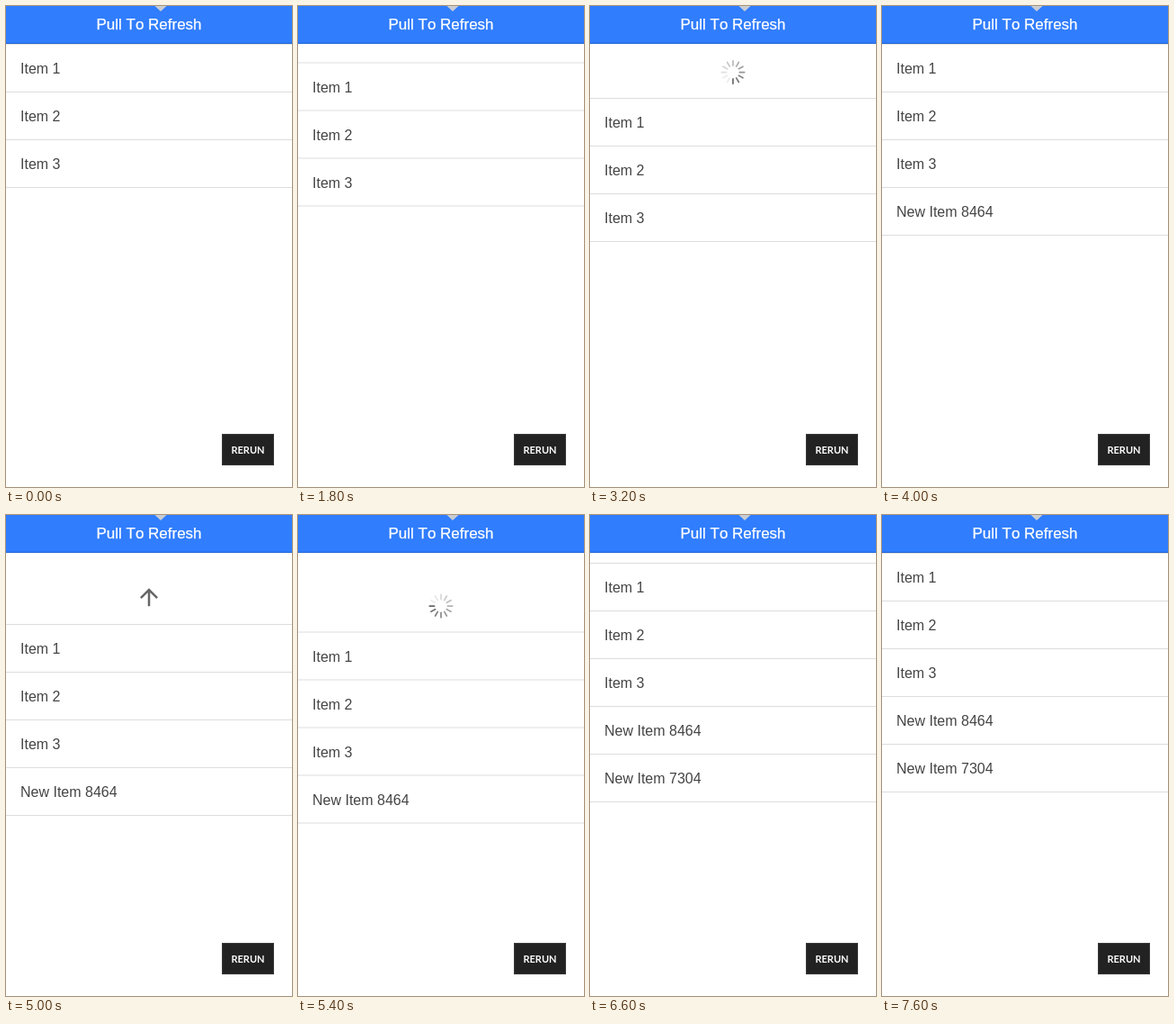
Recreate the animation shown at these times as an HTML page with a canvas. Size 318 px wide and 534 px high, loop 7.8 s.

```html
<!DOCTYPE html>
<html lang="en">
<head>
<meta charset="utf-8">
<title>Pull To Refresh</title>
<style>
  html, body { margin: 0; width: 100%; height: 100%; overflow: hidden; background: #fff; }
  canvas { display: block; width: 318px; height: 534px; }
</style>
</head>
<body>
<canvas id="stage"></canvas>
<script>
const W = 318, H = 534, LOOP = 7800, STEP = 200;
const HEADER = 42, ROW = 53, MID = 159;
const SANS = '"Liberation Sans", Arial, sans-serif';
const LABELS = ['Item 1', 'Item 2', 'Item 3', 'New Item 8464', 'New Item 7304'];
const PULLS = [{ start: 1800, peak: 109.5 }, { start: 4600, peak: 97.5 }];
const FIRST = 20.5, HOLD = 60;
const DRAG = 600, RELEASE = 750, SETTLE = 500, DONE = 1800, CLOSE = 460;

const canvas = document.getElementById('stage');
const ctx = canvas.getContext('2d');
const dpr = window.devicePixelRatio || 1;
canvas.width = W * dpr;
canvas.height = H * dpr;

const clamp = v => Math.min(1, Math.max(0, v));
const rest = p => (1 - clamp(p)) ** 3;

// How far the list is pulled down, u ms after the drag begins
function pullOffset(u, peak) {
  if (u < 0) return 0;
  let y;
  if (u < RELEASE) y = FIRST + (peak - FIRST) * (1 - (1 - clamp(u / DRAG)) ** 1.3);
  else if (u < DONE) y = HOLD + (peak - HOLD) * rest((u - RELEASE) / SETTLE);
  else y = HOLD * rest((u - DONE) / CLOSE);
  return Math.round(y * 2) / 2;
}

function rect(x, y, w, h, color) {
  ctx.fillStyle = color;
  ctx.fillRect(x, y, w, h);
}

function text(str, x, y, font, color, align = 'left') {
  ctx.font = font;
  ctx.fillStyle = color;
  ctx.textAlign = align;
  ctx.fillText(str, x, y);
}

function arrow(y, up) {
  ctx.save();
  ctx.translate(MID, y);
  if (up) ctx.scale(1, -1);
  ctx.strokeStyle = '#666';
  ctx.lineWidth = 2.5;
  ctx.lineCap = 'butt';
  ctx.beginPath();
  ctx.moveTo(0, -10);
  ctx.lineTo(0, 8);
  ctx.moveTo(-9.1, -0.9);
  ctx.lineTo(0, 8.2);
  ctx.lineTo(9.1, -0.9);
  ctx.stroke();
  ctx.restore();
}

function spinner(y, t) {
  const head = 0.5 + (t - 5400) / 1000;
  ctx.save();
  ctx.translate(MID, y);
  ctx.strokeStyle = '#666';
  ctx.lineWidth = 1.75;
  ctx.lineCap = 'round';
  for (let i = 0; i < 12; i++) {
    const behind = (((head - i / 12) % 1) + 1.0001) % 1;
    ctx.globalAlpha = Math.max(0.12, 1 - behind);
    ctx.beginPath();
    ctx.moveTo(7.4, 0);
    ctx.lineTo(12.7, 0);
    ctx.stroke();
    ctx.rotate(Math.PI / 6);
  }
  ctx.restore();
}

function list(top, count) {
  rect(0, top, W, 1, '#ddd');
  for (let i = 0; i < count; i++) {
    const y = top + i * ROW;
    text(LABELS[i], 16, y + 33, '16px ' + SANS, '#444');
    rect(0, y + ROW, W, 1, '#ddd');
  }
}

function header() {
  rect(0, 0, W, HEADER, '#307dfd');
  rect(0, HEADER - 1, W, 1, '#1d62d6');
  ctx.fillStyle = '#c9ccd2';
  ctx.beginPath();
  ctx.moveTo(165.5, 0);
  ctx.lineTo(178.5, 0);
  ctx.lineTo(172, 6);
  ctx.fill();
  text('Pull To Refresh', MID, 26, '17px ' + SANS, '#fff', 'center');
  ctx.strokeStyle = '#fff';
  ctx.lineWidth = 0.25;
  ctx.strokeText('Pull To Refresh', MID, 26);
}

function button() {
  rect(240, 475, 58, 35, '#3a3a3a');
  rect(241, 476, 56, 33, '#222');
  text('RERUN', 269, 497, 'bold 11px Lato, sans-serif', '#fff', 'center');
}

function draw(t) {
  const pull = PULLS[t < PULLS[1].start ? 0 : 1];
  const u = t - pull.start;
  const off = pullOffset(u, pull.peak);
  const top = HEADER + off;
  const count = 3 + PULLS.filter(p => t >= p.start + DONE).length;

  ctx.setTransform(dpr, 0, 0, dpr, 0, 0);
  ctx.fontKerning = 'none';
  rect(0, 0, W, H, '#fff');
  if (off > 25) {
    if (u < RELEASE) arrow(top - 29.75, off > HOLD);
    else spinner(top - 28.5, t);
  }
  list(top, count);
  header();
  button();
}

const begin = performance.now();
function tick() {
  const t = (performance.now() - begin) % LOOP;
  draw(Math.floor(t / STEP) * STEP);
  requestAnimationFrame(tick);
}
tick();
</script>
</body>
</html>
```
